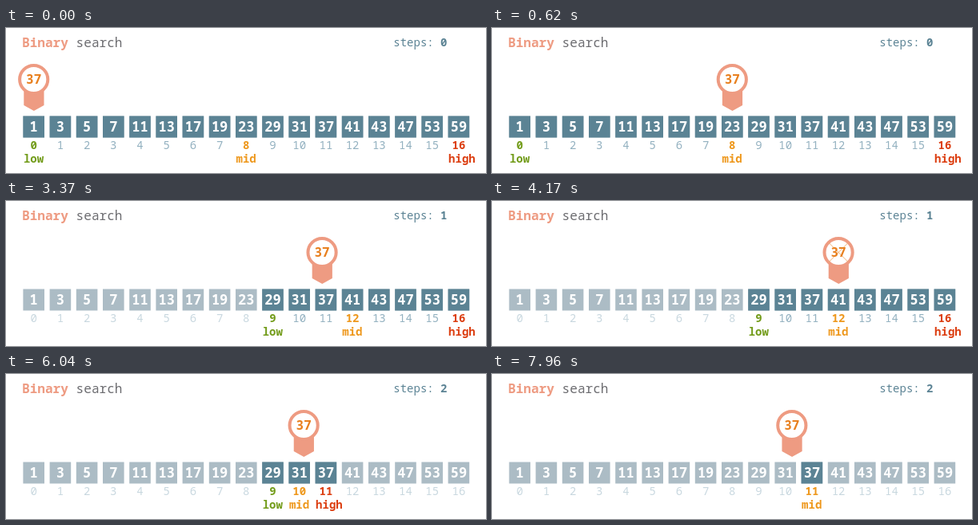
An HTML page for the animation above (8 s loop, 600 by 182 pixels).

```html
<!DOCTYPE html>
<html lang="en">
<head>
<meta charset="utf-8">
<title>Binary search</title>
<style>
  html, body { margin: 0; width: 100%; height: 100%; overflow: hidden; background: #fff; }
  svg { display: block; width: 100%; height: 100%; }
  text { font: 14px "Noto Sans Mono", "DejaVu Sans Mono", monospace; white-space: pre; }
  .title { font-size: 16.1px; fill: #6c6c70; }
  .title tspan { font-weight: 700; fill: #ee9b82; }
  .steps { fill: #5b8394; }
  .bold, .steps tspan { font-weight: 700; }
  .centered { text-anchor: middle; }
  .dim { fill: #acbcc5; }
  .lit { fill: #5b8394; }
  .value { font-size: 17px; font-weight: 600; fill: #fff; }
  .index { fill: #93b1c0; }
  .low { fill: #739c1b; }
  .mid { fill: #ee981d; }
  .high { fill: #dc3f12; }
  .pin { fill: #ee9b82; }
  .ring { fill: #fff; stroke: #ee9b82; stroke-width: 4; }
  .key { font-size: 16px; font-weight: 600; fill: #e8801f; }
  .cross { stroke: #f3b070; stroke-width: 1; }
</style>
</head>
<body>
<svg viewBox="0 0 600 182">
  <text class="title" x="20" y="24"><tspan>Binary</tspan> search</text>
  <text class="steps" x="484.3" y="22.5">steps: <tspan id="count">0</tspan></text>
  <g id="row"></g>
  <g id="pointer">
    <path class="pin" d="M-12.4 78H12.8V97L.2 104L-12.4 97Z"/>
    <circle class="ring" cy="64.5" r="17.6"/>
    <path id="cross" class="cross" d="M-12 52.5L12 76.5M12 52.5L-12 76.5"/>
    <text class="key centered" y="70.2">37</text>
  </g>
</svg>
<script>
const LOOP = 8000;
const LEAD = 40; // time between the start of a move and its first visible step
const CELL = 26.6;
const values = [1, 3, 5, 7, 11, 13, 17, 19, 23, 29, 31, 37, 41, 43, 47, 53, 59];
const stages = [
  { from: 0, to: 16, count: 0, marks: { low: 0, mid: 8, high: 16 } },
  { from: 9, to: 16, count: 1, marks: { low: 9, mid: 12, high: 16 } },
  { from: 9, to: 11, count: 2, marks: { low: 9, mid: 10, high: 11 } },
  { from: 11, to: 11, count: 2, marks: { mid: 11 } }
];
const stops = [0, 8, 12, 10, 11];
const moves = [
  { first: 40, last: 620, steps: 15 },
  { first: 3120, last: 3710, steps: 15 },
  { first: 5670, last: 6210, steps: 14 },
  { first: 7920, last: 8500, steps: 15 }
];
const fades = [
  { first: 1250, last: 1620, steps: 10 },
  { first: 4170, last: 4580, steps: 11 },
  { first: 6670, last: 7080, steps: 11 }
];

const byId = id => document.getElementById(id);
const row = byId("row"), pointer = byId("pointer"), cross = byId("cross"), count = byId("count");
const centerX = i => 34.7 + 33.2 * i;
const mix = (a, b, p) => a + (b - a) * p;
const easeOut = u => 1 - (1 - u) ** 2;

function add(parent, tag, attrs, content = "") {
  const node = document.createElementNS("http://www.w3.org/2000/svg", tag);
  for (const name in attrs) node.setAttribute(name, attrs[name]);
  node.textContent = content;
  return parent.appendChild(node);
}

const cells = values.map((value, i) => {
  const x = centerX(i);
  const box = { x: x - CELL / 2, y: 110.5, width: CELL, height: 27 };
  add(row, "rect", { ...box, class: "dim" });
  const lit = add(row, "rect", { ...box, class: "lit" });
  add(row, "text", { x, y: 129.5, class: "value centered" }, value);
  const index = add(row, "text", { x, y: 152, class: "index centered" }, i);
  return { lit, index };
});

const markers = [];
for (const { marks } of stages) {
  for (const [role, i] of Object.entries(marks)) {
    if (markers.some(m => m.role === role && m.i === i)) continue;
    const node = add(row, "g", { class: role });
    add(node, "text", { x: centerX(i), y: 152, class: "bold centered" }, i);
    add(node, "text", { x: centerX(i) - CELL / 2 + 0.5, y: 169, class: "bold" }, role);
    markers.push({ role, i, node });
  }
}

const litAlpha = (stage, i) => i >= stage.from && i <= stage.to ? 1 : 0;
const indexAlpha = (stage, i) =>
  Object.values(stage.marks).includes(i) ? 0 : mix(0.5, 1, litAlpha(stage, i));
const markAlpha = (stage, m) => stage.marks[m.role] === m.i ? 1 : 0;

// Stepped progress from 0 to 1, or -1 before the first step.
function progress({ first, last, steps }, t) {
  if (t < first) return -1;
  const n = Math.floor((t - first) / (last - first) * (steps - 1) + 0.15);
  return Math.min(1, n / (steps - 1));
}

function pointerX(t) {
  const k = moves.findLastIndex(m => t >= m.first);
  if (k < 0) return centerX(stops[0]);
  const span = moves[k].last - moves[k].first;
  const u = (progress(moves[k], t) * span + LEAD) / (span + LEAD);
  return mix(centerX(stops[k]), centerX(stops[k + 1]), easeOut(u));
}

function draw(t) {
  const k = Math.max(0, fades.findLastIndex(f => t >= f.first));
  const raw = progress(fades[k], t);
  const p = Math.max(0, raw);
  const a = stages[k], b = stages[k + 1];
  const blend = (alpha, item) => mix(alpha(a, item), alpha(b, item), p);

  cells.forEach(({ lit, index }, i) => {
    lit.style.opacity = blend(litAlpha, i);
    index.style.opacity = blend(indexAlpha, i);
  });
  for (const m of markers) m.node.style.opacity = blend(markAlpha, m);
  count.textContent = p > 0 ? b.count : a.count;
  cross.style.opacity = raw < 0 ? 0 : 1 - p;
  pointer.setAttribute("transform", `translate(${pointerX(t)} 0)`);
}

const startTime = performance.now();
function tick() {
  draw((performance.now() - startTime) % LOOP);
  requestAnimationFrame(tick);
}
tick();
</script>
</body>
</html>
```
